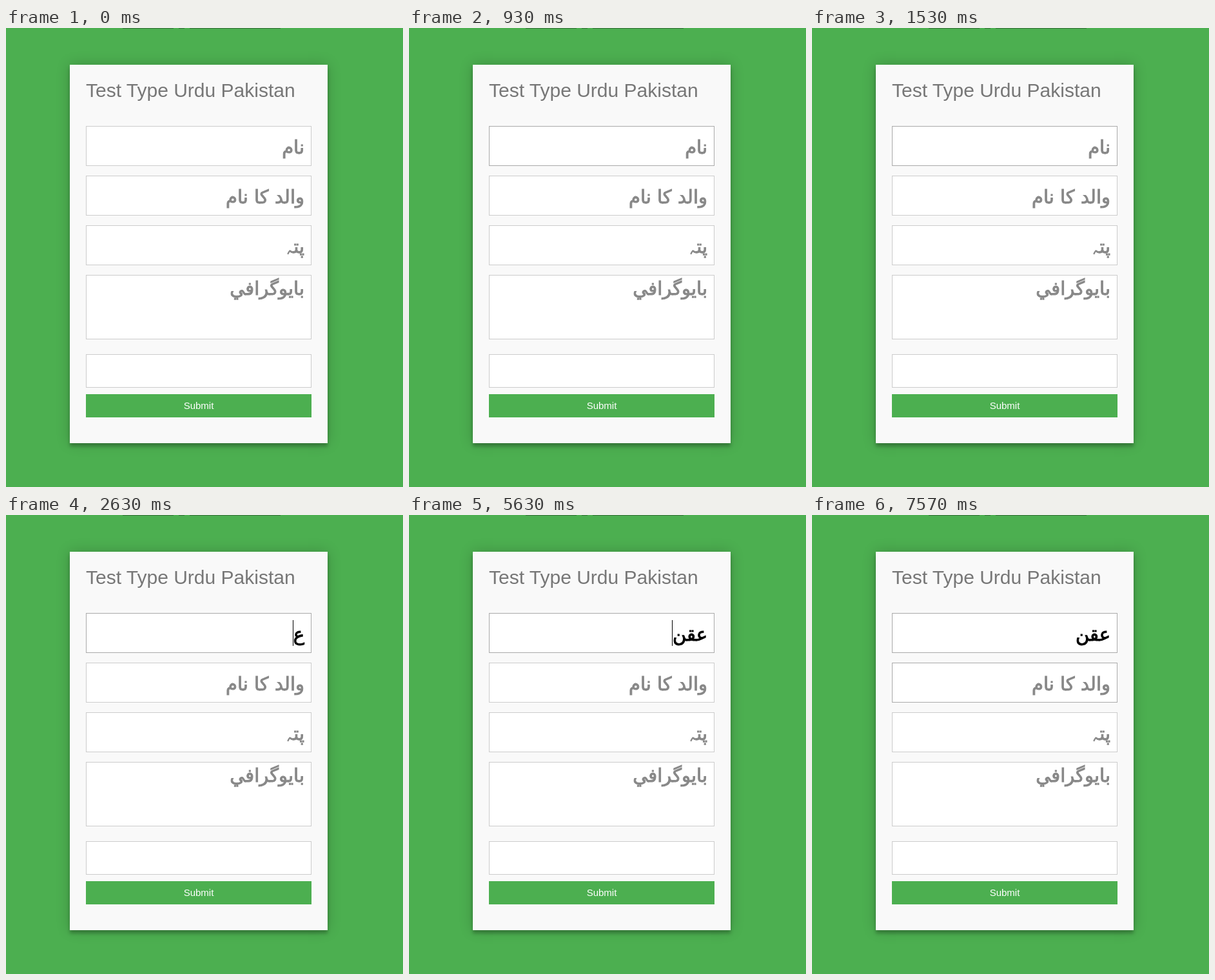
These frames come from a looping animation (616 px wide and 712 px high, 8000 ms). An HTML page:

```html
<!DOCTYPE html>
<html lang="en">
<head>
<meta charset="utf-8">
<title>Form typing</title>
<style>
html, body { margin: 0; width: 100%; height: 100%; overflow: hidden; background: #4caf50; }
.card {
  position: absolute; left: 99px; top: 57px; width: 400px; height: 587px;
  background: #f9f9f9;
  box-shadow: 0 0 20px rgba(0, 0, 0, .2), 0 5px 5px rgba(0, 0, 0, .24);
}
svg { position: absolute; left: 0; top: 0; }
.latin { font-family: "Liberation Sans", Arial, sans-serif; }
.urdu { font: 29px "DejaVu Sans", sans-serif; direction: rtl; stroke-width: 1px; }
.hint { fill: #888; stroke: #888; }
.typed { fill: #000; stroke: #000; }
.field { fill: #fff; stroke: #ccc; }
</style>
</head>
<body>
<div class="card"></div>
<svg width="616" height="712">
  <path d="M181 .5H260M268 .5H277M285 .5H426" stroke="#37703a"/>
  <text class="latin" x="124" y="107" font-size="30" fill="#777">Test Type Urdu Pakistan</text>
  <g id="fields"></g>
  <text id="typed" class="urdu typed" x="463" y="195"></text>
  <rect id="caret" width="1" height="40"/>
  <rect x="124" y="568" width="350" height="36" fill="#4caf50"/>
  <text class="latin" x="299" y="591" font-size="15" fill="#fff" text-anchor="middle">Submit</text>
</svg>
<script>
const LOOP = 8000, RIGHT = 463;
const $ = id => document.getElementById(id);

// top, height, placeholder, baseline
const rows = [
  [152, 62, "نام", 195],
  [229, 62, "والد کا نام", 272],
  [306, 62, "پتہ", 349],
  [383, 100, "بايوگرافي", 414],
  [506, 52, "", 0]
];
$("fields").innerHTML = rows.map(([y, h, hint, base]) =>
  `<rect class="field" x="124.5" y="${y + .5}" width="349" height="${h - 1}"/>` +
  `<text class="urdu hint" x="${RIGHT}" y="${base}">${hint}</text>`).join("");
const boxes = document.querySelectorAll(".field");
const hints = document.querySelectorAll(".hint");

// each key press or focus change restarts the caret blink
const name = "عقن";
const events = [
  { at: 1000, row: 0, chars: 0, blink: 500 },
  { at: 2570, row: 0, chars: 1, blink: 550 },
  { at: 4370, row: 0, chars: 2, blink: 530 },
  { at: 4570, row: 0, chars: 3, blink: 530 },
  { at: 6030, row: 1, chars: 3, blink: 510 }
];

// borders darken on hover and on focus
const fades = [{ at: 400, length: 370 }, { at: 5900, length: 130 }];

function draw(t) {
  fades.forEach(({ at, length }, i) => {
    const p = Math.min(1, Math.max(0, (t - at) / length));
    const grey = Math.round(204 - 34 * p * p * (3 - 2 * p));
    boxes[i].style.stroke = `rgb(${grey}, ${grey}, ${grey})`;
  });

  const now = events.filter(e => e.at <= t).pop();
  const chars = now ? now.chars : 0;
  const text = $("typed"), caret = $("caret");
  hints[0].style.display = chars ? "none" : "";
  const value = name.slice(0, chars);
  if (text.textContent !== value) text.textContent = value;

  const on = now && Math.floor((t - now.at) / now.blink) % 2 === 0;
  caret.style.display = on ? "" : "none";
  if (on) {
    const width = now.row === 0 && chars ? text.getComputedTextLength() : 0;
    caret.setAttribute("x", Math.round(RIGHT - 1 - width));
    caret.setAttribute("y", rows[now.row][0] + 11);
  }
}

const start = performance.now();
function frame() {
  draw((performance.now() - start) % LOOP);
  requestAnimationFrame(frame);
}
frame();
</script>
</body>
</html>
```
